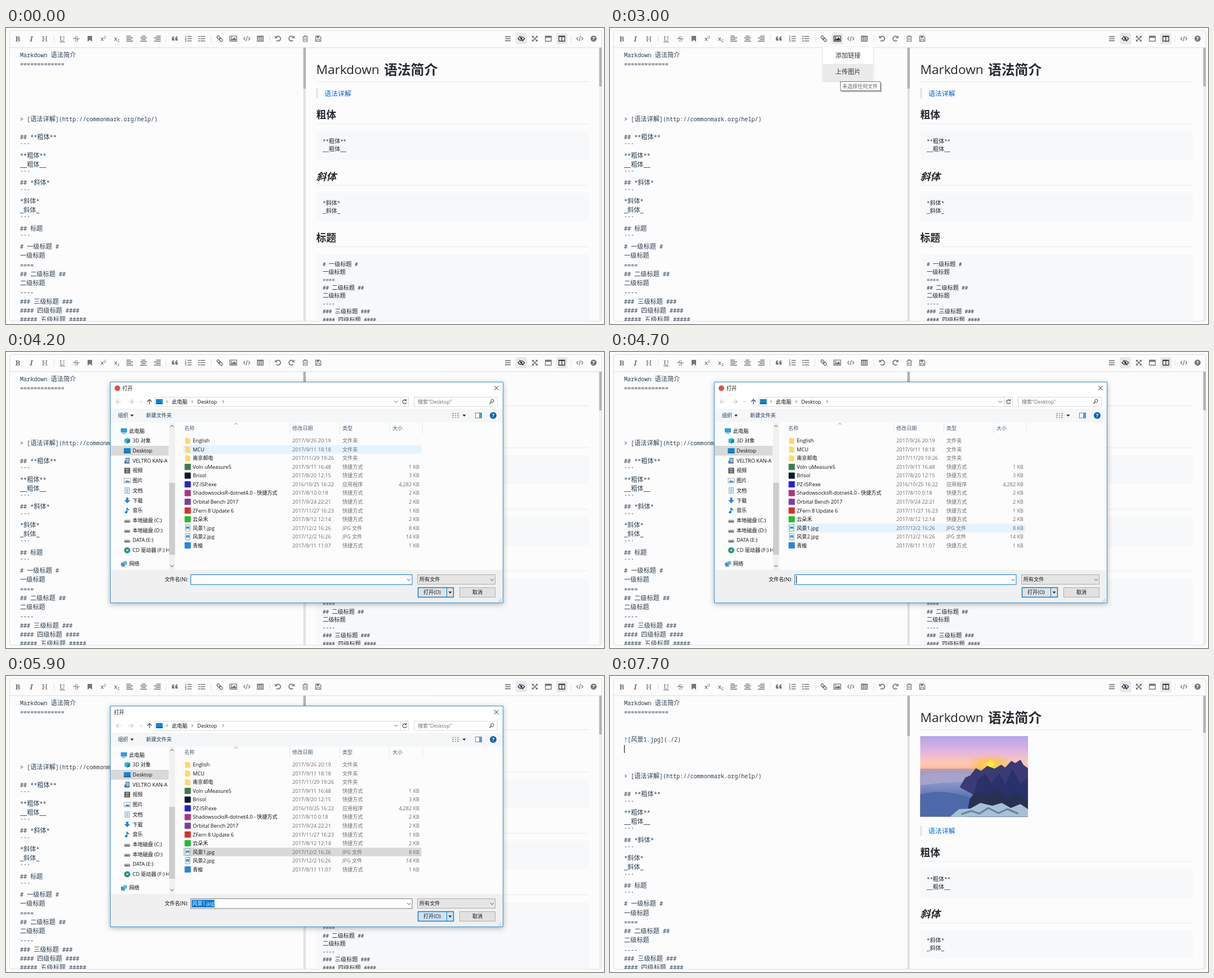
An HTML page that plays this animation: 1063 px wide and 527 px high, repeating every 8000 ms.

```html
<!DOCTYPE html>
<html lang="zh">
<head>
<meta charset="utf-8">
<title>Markdown editor</title>
<style>
html, body { margin: 0; width: 100%; height: 100%; overflow: hidden; background: #fcfcfc; }
svg { display: block; width: 100%; height: 100%; }
text { white-space: pre; font-family: "Open Sans", "Noto Sans CJK SC", "Noto Sans CJK", sans-serif; }
.mono { font-family: "Noto Sans Mono", "Noto Sans CJK SC", "Noto Sans CJK", monospace; }
.cjk { font-family: "Noto Sans CJK SC", "Noto Sans CJK", sans-serif; }
.serif { font-family: "Noto Serif", "Liberation Serif", serif; }
</style>
</head>
<body>
<svg id="stage" viewBox="0 0 1063 527" xmlns="http://www.w3.org/2000/svg"></svg>
<script>
const LOOP = 8000, STEP = 100, LINE = 16.24;

// ---- markup helpers ----
const rect = (x, y, w, h, fill, more = '') =>
  `<rect x="${x}" y="${y}" width="${w}" height="${h}" fill="${fill}" ${more}/>`;
const fillPath = (d, fill = 'currentColor') => `<path d="${d}" fill="${fill}"/>`;
const line = (d, w = 1.5, color = 'currentColor') =>
  `<path d="${d}" fill="none" stroke="${color}" stroke-width="${w}"/>`;
const dot = (x, y, r, fill = 'currentColor') => `<circle cx="${x}" cy="${y}" r="${r}" fill="${fill}"/>`;
const at = (x, y, body, more = '') => `<g transform="translate(${x} ${y})" ${more}>${body}</g>`;
const group = (id, body, more = '') => `<g id="${id}" ${more}>${body}</g>`;
const label = (x, y, s, size = 9.1, fill = '#111', more = '') =>
  `<text x="${x}" y="${y + size * 0.36}" font-size="${size}" fill="${fill}" ${more}>${s}</text>`;
const hidden = 'visibility="hidden"';

// Latin and Chinese runs of a code line have different sizes.
function mono(x, y, s, latin, cjk, fill) {
  const runs = s.match(/[\u4e00-\u9fff]+|[^\u4e00-\u9fff]+/g) || [];
  const spans = runs.map(r => /[\u4e00-\u9fff]/.test(r)
    ? `<tspan class="cjk" font-size="${cjk}">${r}</tspan>` : `<tspan>${r}</tspan>`);
  return `<text class="mono" x="${x}" y="${y + cjk * 0.36}" font-size="${latin}" fill="${fill}">${spans.join('')}</text>`;
}

// ---- toolbar ----
const letter = (s, more = '') =>
  `<text class="serif" y="4.8" font-size="13.2" text-anchor="middle" fill="currentColor" ${more}>${s}</text>`;
const script = dy => `<text x="-5" y="3.5" font-size="11" font-weight="600" fill="currentColor">x<tspan dy="${dy}" font-size="6.5">2</tspan></text>`;
const frame = (w, h) => line(`M${-w / 2} ${-h / 2}h${w}v${h}h${-w}z`, 1.3);
const undo = line('M-3.8-2.6A4.3 4.3 0 1 1-3.4 3', 1.7) + fillPath('M-5.6-5.4v4.6h4.6z');
const codeMark = line('M-3-3L-5.6 0L-3 3M3-3L5.6 0L3 3M1.2-4.5L-1.2 4.5', 1.2);
const leftBars = 'M-6-4.5h8M-6-1.5h12M-6 1.5h9M-6 4.5h12';
const quoteHalf = fillPath('M-5.2 1.8V-.6Q-5-4-1.2-4.2V-2.4Q-2.8-2.3-2.9-.8H-.8V3.6H-4Q-5.2 3.4-5.2 1.8z');

const buttons = [
  [21, letter('B', 'font-weight="700"')],
  [45, letter('I', 'font-style="italic" font-weight="600"')],
  [69, letter('H', 'font-weight="500"')],
  [100, letter('U', 'font-size="12"') + line('M-5 6h10', 1)],
  [125, letter('S') + line('M-6 0h12', 1)],
  [149, fillPath('M-4-5h8v10.5L0 2L-4 5.5z')],
  [173, script(-4)],
  [197, script(2.5)],
  [220, line(leftBars, 1.7)],
  [244.5, line('M-3.5-4.5h7M-6-1.5h12M-4 1.5h8M-6 4.5h12', 1.7)],
  [269, `<g transform="scale(-1 1)">${line(leftBars, 1.7)}</g>`],
  [300, quoteHalf + at(6, 0, quoteHalf)],
  [324, line('M-1.5-4h7.5M-1.5 0h7.5M-1.5 4h7.5', 1.6) +
    [1, 2, 3].map(n => `<text x="-6" y="${n * 4 - 6}" font-size="5" font-weight="700" fill="currentColor">${n}</text>`).join('')],
  [348, line('M-2.5-4h8.5M-2.5 0h8.5M-2.5 4h8.5', 1.6) + line('M-6-4h2.2M-6 0h2.2M-6 4h2.2', 2.2)],
  [380, '<g transform="rotate(45)" fill="none" stroke="currentColor" stroke-width="1.5"><rect x="-6" y="-2.1" width="6.6" height="4.2" rx="1.8"/><rect x="-.6" y="-2.1" width="6.6" height="4.2" rx="1.8"/></g>'],
  [404, frame(12, 9.4) + dot(-3, -1.8, 1.2) + fillPath('M-4.8 3.3V1.5L-2.6-.2L-1.3 1L2-2.4L4.8.5V3.3z')],
  [428, codeMark],
  [452, frame(10.5, 9) + line('M-5.2-3.8h10.5', 2) + line('M-5-1h10M-5 1.8h10M-1.7-3v7.5M1.7-3v7.5', 1)],
  [484, undo],
  [507, `<g transform="scale(-1 1)">${undo}</g>`],
  [532, line('M-5-3.3h10M-1.8-3.5v-1.6h3.6v1.6M-3.6-3v8h7.2v-8M-1.4-1v4.3M1.4-1v4.3', 1.1)],
  [555, line('M-4.6-4.6h7l2.2 2.2v7h-9.2z', 1.3) + line('M-2.4 4.5V1h4.8v3.5', 1.1) + fillPath('M-2.8-4.6h4.4v3.2h-4.4z')],
  [892, line('M-5-3.7h10M-5 0h10M-5 3.7h10', 1.7)],
  [916, line('M-5.8 0Q0-7 5.8 0Q0 7-5.8 0z', 1.2) + dot(0, 0, 2) + line('M-3.4-5L3.4 5', 1.3), true],
  [940, line('M-4-4L4 4M4-4L-4 4', 1.6) + fillPath('M-5-5h4L-5-1zM5-5v4L1-5zM-5 5v-4L-1 5zM5 5h-4L5 1z')],
  [964, frame(10.5, 9) + fillPath('M-5.2-4.5h10.5v3h-10.5z')],
  [988, frame(10.5, 9) + line('M-5.2-3.9h10.5', 1.8) + line('M0-4v8.5', 1.3), true],
  [1020, codeMark],
  [1044.5, dot(0, 0, 5.4) + '<text y="3" font-size="8.5" font-weight="800" text-anchor="middle" fill="#fff">?</text>'],
];
const toolbar = buttons.map(([x, body, on]) =>
  at(x, 19, rect(-10, -10, 20, 20, '#e9e9eb', `rx="3" class="back" ${on ? '' : hidden}`) + body,
    `class="button" color="${on ? '#3a3a3a' : '#757575'}"`)).join('') +
  [85, 284, 364, 468, 1004].map(x => rect(x, 13, 1, 12, '#e3e3e3')).join('');

// ---- editor ----
const head = ['Markdown 语法简介', '============='];
const tail = `> [语法详解](http://commonmark.org/help/)

## **粗体**
\`\`\`
**粗体**
__粗体__
\`\`\`
## *斜体*
\`\`\`
*斜体*
_斜体_
\`\`\`
## 标题
\`\`\`
# 一级标题 #
一级标题
====
## 二级标题 ##
二级标题
----
### 三级标题 ###
#### 四级标题 ####
##### 五级标题 #####`.split('\n');
const editLine = (s, i) => mono(25, 48 + i * LINE, s, 10.1, 11.2, '#2c3e50');
const editor = head.map(editLine).join('') +
  group('inserted', editLine('![风景1.jpg](./2)', 4)) +
  group('tail', tail.map((s, i) => editLine(s, i + 7)).join('')) +
  rect(25, 90, 1, 14, '#000', 'id="caret"');

// ---- preview ----
const section = (y, title, lines, h, more = '') =>
  label(551.5, y, title, 17.7, '#24292e', `font-weight="700" class="cjk" ${more}`) +
  rect(552, y + 15, 484, 1, '#e9ebee') + rect(552, y + 29, 484, h, '#f6f8fa', 'rx="2"') +
  lines.map((s, i) => mono(563, y + 46.5 + i * 14.05, s, 9, 10.2, '#24292e')).join('');

const photo = at(551.5, 107, rect(0, 0, 191.5, 143.5, 'url(#sky)') +
  rect(0, 58, 191.5, 85.5, 'url(#fog)') +
  '<ellipse cx="124" cy="52" rx="42" ry="20" fill="url(#glow)"/>' + dot(125, 49, 6, '#ffee3c') +
  fillPath('M0 70Q40 60 85 68T120 84Q60 78 0 88z', '#a5a3cb') +
  fillPath('M0 104Q40 92 90 110V143H0z', '#4d69aa') +
  fillPath('M70 91L80 74L89 70L99 57L108 62L119 53L132 58L144 51L151 56L162 44L169 48L178 42L184 52L191.5 57V143.5H88L94 104z', '#393a76') +
  fillPath('M102 78L115 67L127 84L140 65L151 87L164 58L178 86L191.5 73V128H90z', '#29316a') +
  fillPath('M88 112L99 98L119 106L137 95L154 112L172 99L191.5 113V143.5H82z', '#293153') +
  fillPath('M53 143.5L69 130L89 129L107 119L128 124L145 119L161 128L178 121L191.5 130V143.5z', '#a8c0d6') +
  line('M73 139L91 133L105 138L121 128L139 137L155 130L174 138', 3, '#64829f'));

const preview = label(551.5, 74, 'Markdown', 22.6, '#24292e', 'font-weight="500"') +
  label(672, 74, '语法简介', 23.8, '#24292e', 'font-weight="700" class="cjk"') +
  rect(552, 95, 484, 1, '#e6e8eb') + group('photo', photo) +
  group('body', rect(551.5, 107.5, 3, 18, '#dfe2e5') + label(566, 116.5, '语法详解', 11.9, '#0366d6') +
    section(155, '粗体', ['**粗体**', '__粗体__'], 51) +
    section(264.5, '斜体', ['*斜体*', '_斜体_'], 51, 'font-style="italic"') +
    section(374, '标题', tail.slice(14, 22), 140));

// ---- menu and tooltip ----
const menu = rect(378.5, 34, 89, 59.5, '#fff', 'filter="url(#soft)"') +
  rect(379, 64, 88, 29.5, '#eaeaea', 'id="menuHover"') +
  label(423, 48.5, '添加链接', 11.2, '#333', 'text-anchor="middle"') +
  label(423, 78, '上传图片', 11.2, '#333', 'text-anchor="middle"');
const tip = rect(411, 98, 72, 16, '#000', 'opacity=".28"') +
  rect(409.5, 95.5, 71, 16, '#fff', 'stroke="#7d7d7d"') + label(413, 103.5, '未选择任何文件', 9, '#666');

// ---- file dialog ----
const glyphs = {
  pc: rect(-5.5, -4.5, 11, 7.5, '#2b9fe8') + line('M-3 4.5h6', 1.2, '#6c8ba0'),
  cube: fillPath('M-5-3L0-5L5-3V3L0 5L-5 3z', '#35b6d6') + fillPath('M0-1L5-3V3L0 5z', '#1785a8'),
  screen: rect(-6, -4.5, 12, 9, '#0f84d8') + rect(-6, 2.7, 12, 1.8, '#0b63a6'),
  phone: rect(-3, -5, 7, 10, '#54616d') + rect(-2, -4, 5, 7, '#8fc6ea') + rect(-5, 0, 3, 5, '#2f7fc0'),
  film: rect(-5, -5, 10, 10, '#474747') + rect(-3, -4, 6, 3.5, '#6fa8dc') + rect(-3, .5, 6, 3.5, '#c98b54'),
  picture: rect(-5.5, -4, 11, 8, '#fff', 'stroke="#9ab"') + fillPath('M-4.5 3L-1-1L1.5 1L3-.5L4.5 3z', '#3b8fd0'),
  page: rect(-4, -5, 8, 10, '#fff', 'stroke="#8aa5bb"') + line('M-2.5-2.5h5M-2.5 0h5M-2.5 2.5h5', 1, '#4a90c8'),
  down: fillPath('M-2-5h4v4.5h3.5L0 5L-5.5-.5H-2z', '#2c83d8'),
  note: line('M-.5 3.5V-5Q0-2 3.5-1', 1.7, '#1584d8') + dot(-2, 3.3, 2.2, '#1584d8'),
  drive: rect(-5, 0, 10, 4, '#737b80') + rect(-5, -1.5, 10, 2, '#c4c9cc') + rect(2, 1.5, 2, 1, '#58d68d'),
  disc: dot(0, 0, 5.5, '#2f9a58') + dot(1.5, -1, 3.2, '#3c8fd0') + dot(0, 0, 1.3, '#fff'),
  net: rect(-5, -2, 7, 6, '#2b8fd6') + rect(-1, -4.5, 6.5, 6, '#5db4ea') + line('M-4 5h6', 1, '#6c8ba0'),
  folder: fillPath('M-4.5-5.5h4l1 1.2h4V5.5h-9z', '#ffd869'),
  jpg: rect(-4, -5.5, 8, 11, '#fff', 'stroke="#8b98a5"') + rect(-2.8, -2.5, 5.6, 4.5, '#1e88d8') + fillPath('M-2.8 2L0-.5L2.8 2z', '#a8d4f0'),
};

const places = [['此电脑', 'pc'], ['3D 对象', 'cube'], ['Desktop', 'screen'], ['VELTRO KAN-A', 'phone'],
  ['视频', 'film'], ['图片', 'picture'], ['文档', 'page'], ['下载', 'down'], ['音乐', 'note'],
  ['本地磁盘 (C:)', 'drive'], ['本地磁盘 (D:)', 'drive'], ['DATA (E:)', 'drive'], ['CD 驱动器 (F:) H', 'disc'], ['网络', 'net']];
const sidebar = rect(186, 167, 103.5, 17.5, '#d9d9d9') +
  places.map(([name, icon], i) => {
    const root = i === 0 || i === 13, y = i === 13 ? 377 : 140.3 + i * 17.72;
    return at(root ? 209.5 : 215.5, y, glyphs[icon]) + label(root ? 219 : 225, y, name);
  }).join('');

// name | date | type | size | icon or plain colour
const files = `English|2017/9/26 20:19|文件夹||folder
MCU|2017/9/11 18:18|文件夹||folder
南京邮电|2017/11/29 19:26|文件夹||folder
Voln uMeasure5|2017/9/11 16:48|快捷方式|1 KB|#3f7d4c
Brisol|2017/8/20 12:15|快捷方式|3 KB|#0d1a2b
PZ-ISP.exe|2016/10/25 16:22|应用程序|4,282 KB|#2222d4
ShadowsocksR-dotnet4.0 - 快捷方式|2017/8/10 0:18|快捷方式|2 KB|#b5307a
Orbital Bench 2017|2017/9/24 22:21|快捷方式|2 KB|#7442a6
ZFern 8 Update 6|2017/11/27 16:23|快捷方式|1 KB|#e02b2b
云朵禾|2017/8/12 12:14|快捷方式|2 KB|#22bd2c
风景1.jpg|2017/12/2 16:26|JPG 文件|8 KB|jpg
风景2.jpg|2017/12/2 16:26|JPG 文件|14 KB|jpg
青梭|2017/8/11 11:07|快捷方式|1 KB|#2a82e4`.split('\n').map(s => s.split('|'));
const rowY = i => 158 + i * 15.53;
const list = files.map(([name, date, type, size, icon], i) => {
  const y = rowY(i), gray = '#6d6d6d';
  return at(323, y, glyphs[icon] || rect(-5.5, -5.5, 11, 11, icon)) + label(332, y, name) +
    label(509, y, date, 9.1, gray) + label(598, y, type, 9.1, gray) +
    label(735, y, size, 9.1, gray, 'text-anchor="end"');
}).join('');

const chevron = (x, y, dy, color = '#555') => line(`M${x - 3} ${y - dy}L${x} ${y + dy}L${x + 3} ${y - dy}`, 1, color);
const crumb = x => line(`M${x - 1} 86l2 2.3l-2 2.3`, 1, '#555');
const wedge = (x, y) => fillPath(`M${x - 3} ${y - 1.5}h6l-3 3.5z`, '#222');
const arrow = (x, color, turn) => `<g transform="translate(${x} 88.5) rotate(${turn})">${line('M4.5 0H-4M0-4L-4 0L0 4', 1.2, color)}</g>`;

const dialog = rect(185.5, 53.5, 698, 393, '#fff', 'filter="url(#shade)"') +
  rect(186, 101, 697, 24.5, '#f5f6f7') + rect(186, 125.5, 697, 262.5, '#fcfcfc') + rect(186, 388, 697, 58, '#f0f0f0') +
  dot(198, 64.5, 5, '#dd5144').replace('<circle', '<circle id="appDot"') +
  label(207, 64.5, '打开', 9.1, '#111', 'id="title"') +
  line('M868 60.5l7.6 7.6M875.6 60.5l-7.6 7.6', 1, '#222') +
  arrow(200, '#c8c8c8', 0) + arrow(222, '#c8c8c8', 180) + chevron(240, 88.5, 1, '#ccc') + arrow(255, '#444', 90) +
  rect(264.5, 80.5, 451, 16.5, '#fff', 'stroke="#d9d9d9"') + at(272.5, 88.3, glyphs.screen) +
  crumb(286) + label(295, 88.3, '此电脑') + crumb(331) + label(340, 88.3, 'Desktop') + crumb(386) +
  chevron(693.5, 88.5, 1.5) + rect(701, 81, 1, 16, '#e0e0e0') +
  line('M711 86A3.5 3.5 0 1 0 712 89.5M711.5 84v2.5h-2.5', 1.1, '#444') +
  rect(725.5, 80.5, 148, 16.5, '#fff', 'stroke="#d9d9d9"') + label(732, 88.5, '搜索"Desktop"', 9.1, '#6d6d6d') +
  '<circle cx="864.5" cy="87" r="2.7" fill="none" stroke="#444"/>' + line('M862.5 89L859.5 92', 1.3, '#444') +
  label(199, 113, '组织', 9.1, '#1e395b') + wedge(224, 113) + label(249, 113, '新建文件夹', 9.1, '#1e395b') +
  line('M793 109.5h3M793 113h3M793 116.5h3M798 109.5h2M798 113h2M798 116.5h2M802 109.5h3M802 113h3M802 116.5h3', 1.5, '#8a949c') + wedge(814.5, 113) +
  rect(834.5, 108.5, 11, 9, '#fff', 'stroke="#5a87a8"') + rect(841, 109, 4, 8, '#4ea3dc') +
  dot(866, 113, 6, '#0b63b4') + label(866, 113, '?', 9.5, '#fff', 'font-weight="700" text-anchor="middle"') +
  `<g clip-path="url(#side)">${sidebar}</g>` +
  rect(290, 126, 10.5, 262, '#f0f0f0') + rect(290, 233, 10.5, 128, '#cdcdcd') +
  chevron(295, 132, -1.5, '#333') + chevron(295, 381, 1.5, '#333') +
  chevron(408.5, 127.8, -1.3, '#888') +
  [['名称', 317], ['修改日期', 509], ['类型', 598], ['大小', 687]].map(([s, x]) => label(x, 135.5, s, 9.1, '#4c607a')).join('') +
  [504, 593, 681, 740].map(x => rect(x, 126, 1, 20, '#e8e8e8')).join('') +
  rect(315, 0, 423.5, 15.4, '#e5f3ff', 'id="hoverRow"') + rect(315, rowY(10) - 7.7, 423.5, 15.4, '#cce8ff', 'id="pickedRow"') + list +
  label(282, 405, '文件名(N):') + rect(328.5, 396.5, 393.5, 17.5, '#fff', 'id="field"') +
  rect(330, 398.5, 40.5, 13.5, '#0078d7', 'id="marked"') + label(331, 405, '风景1.jpg', 9.1, '#111', 'id="fileName"') +
  rect(331, 398.5, 1, 13.5, '#000', 'id="fieldCaret"') + chevron(716, 405.5, 1.5) +
  rect(731.5, 396.5, 138, 17, '#e5e5e5', 'stroke="#adadad"') + label(735, 405, '所有文件') + chevron(864, 405.5, 1.5) +
  rect(732.5, 419.5, 63, 17, '#e1e1e1', 'id="open" stroke="#0078d7" stroke-width="1.4"') + label(742, 428, '打开(O)') +
  rect(783, 420, 1, 16, '#0078d7') + wedge(789.5, 428) +
  rect(806.5, 419.5, 63, 17, '#e1e1e1', 'stroke="#adadad"') + label(838, 428, '取消', 9.1, '#111', 'text-anchor="middle"') +
  line('M875 445l6-6M878 445l3-3', 1, '#b5b5b5');

// ---- stage ----
const stop = (o, c, a = 1) => `<stop offset="${o}" stop-color="${c}" stop-opacity="${a}"/>`;
const fade = (id, ...stops) => `<linearGradient id="${id}" x2="0" y2="1">${stops.join('')}</linearGradient>`;
const stage = document.getElementById('stage');
stage.innerHTML = `<defs>
  <clipPath id="panes"><rect x="7" y="36" width="1052" height="485.5"/></clipPath>
  <clipPath id="side"><rect x="186" y="126" width="103.5" height="262"/></clipPath>
  <filter id="soft" x="-20%" y="-20%" width="140%" height="140%"><feDropShadow dx="0" dy="1" stdDeviation="1.5" flood-opacity=".25"/></filter>
  <filter id="shade" x="-5%" y="-5%" width="110%" height="112%"><feDropShadow dx="0" dy="2" stdDeviation="5" flood-opacity=".3"/></filter>
  ${fade('sky', stop(0, '#b3a3ea'), stop(.2, '#e5b5de'), stop(.34, '#ffc9ae'), stop(.45, '#f9ad8d'))}
  ${fade('fog', stop(0, '#b99bb9'), stop(.3, '#8995c4'), stop(.6, '#5975b4'), stop(1, '#344d87'))}
  <radialGradient id="glow">${stop(0, '#ffe53b')}${stop(.4, '#ffc640', .8)}${stop(1, '#ffb060', 0)}</radialGradient></defs>` +
  rect(0, 0, 1063, 527, '#fcfcfc') +
  rect(6.5, 4.5, 1052.5, 517.5, '#fcfcfc', 'rx="3" stroke="#dcdcdc"') + rect(7, 34.5, 1052, 1, '#dedede') + toolbar +
  rect(528.5, 35, 4.5, 487, '#e2e2e2') + rect(528.5, 35, 4.5, 73, '#b3b3b3', 'id="leftThumb"') +
  rect(1054.5, 35, 4.5, 487, '#ededed') + rect(1054.5, 35, 4.5, 69, '#b3b3b3', 'id="rightThumb"') +
  `<g clip-path="url(#panes)">${editor}${preview}</g>` +
  group('menu', menu) + group('tip', tip) + group('dialog', dialog, 'stroke-width="1"');

// ---- motion ----
const el = id => document.getElementById(id);
const set = (id, name, value) => el(id).setAttribute(name, value);
const show = (id, on) => set(id, 'visibility', on ? 'inherit' : 'hidden');
const clamp = v => Math.max(0, Math.min(1, v));
set('dialog', 'visibility', 'hidden');
el('dialog').children[0].setAttribute('stroke', '#3f94d6');
const toolButtons = [...document.querySelectorAll('.button')];
const OL = 12, UL = 13, LINK = 14, IMAGE = 15;

function hoveredTool(t) {
  if (t < 1300 || t >= 3400) return -1;
  return [OL, UL, LINK][(t - 1300) / 100] || IMAGE;
}

function hoveredRow(t) {
  if (t < 4200) return -1;
  if (t < 5100) return [1, 4, 6, 8, 9, 10][Math.min(5, (t - 4200) / 100)];
  return t === 5300 ? 11 : t === 5400 ? 12 : -1;
}

function placeCaret(t) {
  const blink = (t >= 6000 && t < 6500) || (t >= 7000 && t < 7500);
  show('caret', (t >= 800 && t < 1300) || blink || t >= 7700);
  set('caret', 'x', blink ? 126 : 25);
  set('caret', 'y', blink ? 106 : t >= 7700 ? 123 : 90);
}

function drawDialog(t) {
  const shown = t >= 3600 && t < 6100;
  show('dialog', shown);
  if (!shown) return;
  const rise = 1 - Math.pow(1 - clamp((t - 3550) / 300), 3.5);
  const k = t < 6000 ? rise : 0.4, scale = 0.9 + 0.1 * k;
  set('dialog', 'opacity', k);
  set('dialog', 'transform', `translate(534.5 250) scale(${scale}) translate(-534.5 -250)`);

  const row = hoveredRow(t), picked = t >= 5100, pressed = t >= 5800;
  show('hoverRow', row >= 0);
  set('hoverRow', 'y', rowY(row) - 7.7);
  show('pickedRow', picked);
  set('pickedRow', 'fill', pressed ? '#d9d9d9' : '#cce8ff');
  show('fileName', picked);
  set('fileName', 'fill', pressed ? '#fff' : '#111');
  show('marked', pressed);
  show('fieldCaret', !picked && Math.floor((t - 3700) / 500) % 2 === 0);
  set('field', 'stroke', picked ? '#7a7a7a' : '#0078d7');
  set('open', 'fill', pressed ? '#cce4f7' : t >= 5600 ? '#e5f1fb' : '#e1e1e1');
  show('appDot', t < 5900);
  set('title', 'x', t < 5900 ? 207 : 192);
}

function draw(t) {
  const tool = hoveredTool(t), added = t >= 6000;
  toolButtons.forEach((b, i) => {
    if (buttons[i][2]) return;
    b.setAttribute('color', i === tool ? '#333' : '#757575');
    b.querySelector('.back').setAttribute('visibility', i === tool ? 'visible' : 'hidden');
  });
  set('menu', 'opacity', t < 3400 ? clamp((t - 1600) / 400) : clamp((3600 - t) / 300));
  show('menuHover', t >= 2600);
  set('tip', 'opacity', t < 3400 ? clamp((t - 2800) / 200) : 0);

  show('inserted', added);
  show('photo', added);
  set('tail', 'transform', `translate(0 ${added ? LINE : 0})`);
  set('body', 'transform', `translate(0 ${added ? 159.5 : 0})`);
  set('leftThumb', 'height', added ? 72 : 73);
  set('rightThumb', 'height', added ? 66 : 69);
  placeCaret(t);
  drawDialog(t);
}

const start = performance.now();
function tick() {
  const t = (performance.now() - start) % LOOP;
  draw(Math.floor(t / STEP) * STEP);
  requestAnimationFrame(tick);
}
tick();
</script>
</body>
</html>
```
